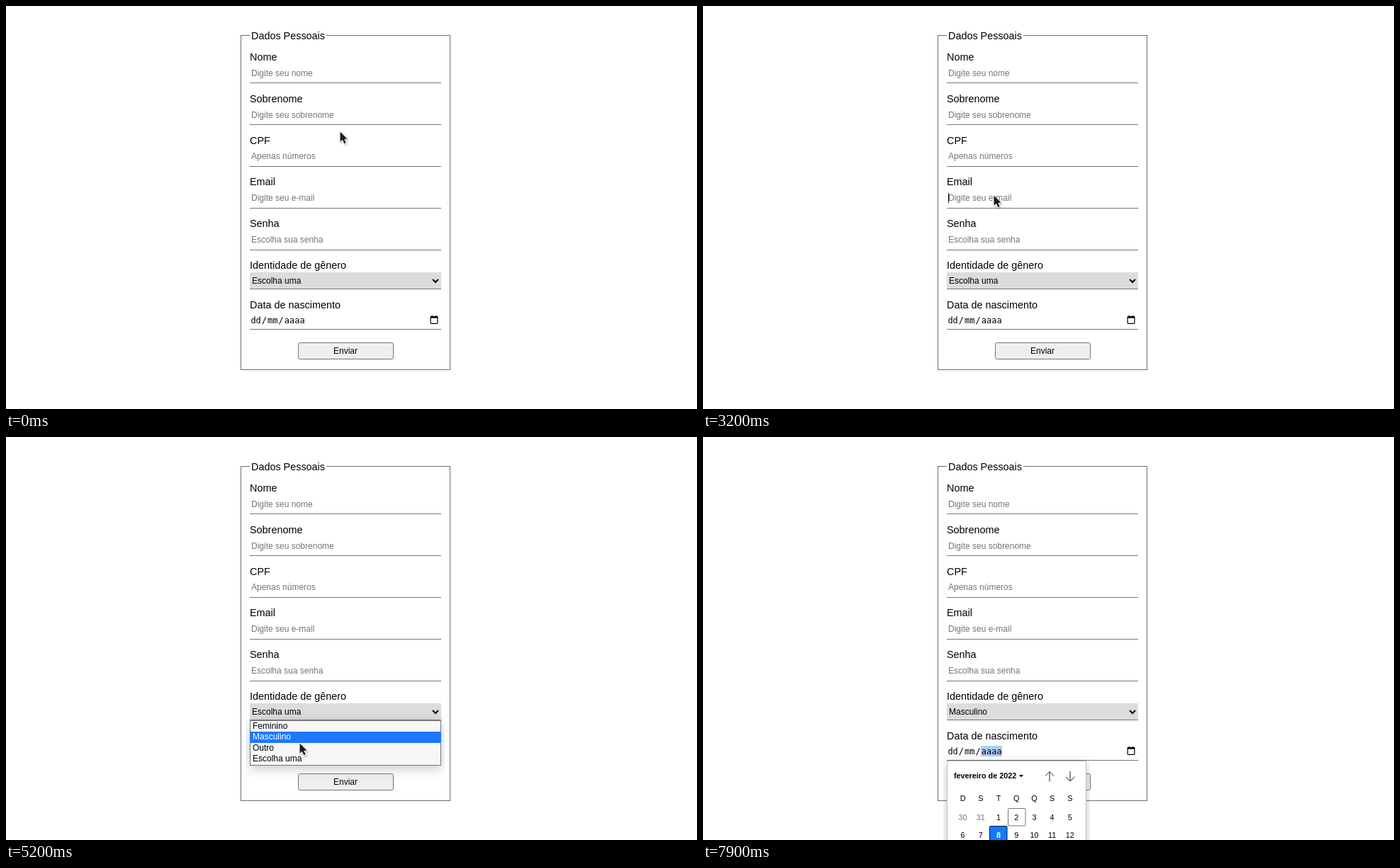
Animation, 975 px wide and 569 px high, one loop 8000 ms. Source, as an HTML page:

```html
<!DOCTYPE html>
<html lang="pt-BR">
<head>
<meta charset="utf-8">
<title>Dados Pessoais</title>
<style>
  html, body { margin: 0; width: 100%; height: 100%; overflow: hidden; background: #fff; }
  svg { display: block; font: 12px "Liberation Sans", Arial, sans-serif; }
  .label { font-size: 14.4px; }
  .hint { fill: #757575; }
  .mono { font-family: "DejaVu Sans Mono", monospace; }
  .cal { font-size: 10.8px; }
  .mid { text-anchor: middle; }
  .bold { font-weight: bold; }
  .line { fill: none; stroke: #767676; }
  .on { fill: #fff; }
</style>
</head>
<body>
<svg width="975" height="569" viewBox="0 0 975 569">
  <defs>
    <filter id="shade" x="-20%" y="-50%" width="140%" height="200%">
      <feDropShadow dx="0" dy="4" stdDeviation="8" flood-opacity=".22"/>
    </filter>
    <filter id="soft" x="-50%" y="-50%" width="200%" height="200%">
      <feDropShadow dx="1" dy="1.5" stdDeviation="1" flood-opacity=".3"/>
    </filter>
    <clipPath id="listClip"><rect x="339" y="384" width="280" height="104"/></clipPath>
    <clipPath id="calClip"><rect x="339" y="441" width="207" height="128"/></clipPath>
  </defs>
  <g id="form"></g>
  <path id="spin" d="M601 212l3.5-4 3.5 4zM601 215h7l-3.5 4z" fill="#505050"/>
  <rect id="caret" x="346" width="1" height="14"/>
  <g id="list"></g>
  <g id="calendar"></g>
  <path id="cursor" d="M0 0V14.2L3.3 11.2 5.8 16.8 8.2 15.8 5.7 10.3H10.2Z" fill="#1c1c1c" stroke="#fff"
    stroke-width="1.6" stroke-linejoin="round" paint-order="stroke" filter="url(#soft)"/>
</svg>
<script>
const LOOP = 8000, STEP = 100;
const ROW = 58.8, OPTION = 15.5, DAY = 25.2;

const $ = id => document.getElementById(id);
const text = (x, y, s, cls = '') => `<text x="${x}" y="${y}" class="${cls}">${s}</text>`;
const rect = (x, y, w, h, attrs = '') =>
  `<rect x="${x}" y="${y}" width="${w}" height="${h}" ${attrs}/>`;
const rule = y => rect(344, y, 270, 1, 'fill="#767676"');
const rowY = (top, i) => Math.floor(top + ROW * i);
const show = (id, on) => { $(id).style.display = on ? '' : 'none'; };

const fields = [
  ['Nome', 'Digite seu nome'], ['Sobrenome', 'Digite seu sobrenome'],
  ['CPF', 'Apenas números'], ['Email', 'Digite seu e-mail'], ['Senha', 'Escolha sua senha']
];
const options = ['Feminino', 'Masculino', 'Outro', 'Escolha uma'];

// Event times; focus has one click per text field.
const focus = [1000, 1700, 2500, 3100, 3600];
const spinAt = 2300, listAt = 4100, chosenAt = 5400, yearAt = 6400, popupAt = 7200, monthAt = 7400;

// Pointer stops: arrival, travel time, x, y.
const stops = [
  [400, 200, 446, 153], [800, 300, 425, 89],
  [1400, 100, 420, 123], [1700, 300, 418, 143],
  [2300, 400, 410, 204], [2900, 400, 409, 262],
  [3200, 100, 410, 267], [3400, 200, 410, 316], [3900, 300, 411, 386],
  [4600, 200, 413, 396], [5000, 400, 414, 435], [5200, 100, 414, 432],
  [5800, 400, 411, 424], [6200, 300, 411, 441], [6500, 200, 431, 444],
  [7000, 400, 602, 442], [7600, 300, 433, 488], [7900, 200, 414, 572]
];

function buildForm() {
  const inputs = fields.map(([name, hint], i) =>
    text(344, rowY(77.6, i), name, 'label') +
    text(346, rowY(99.3, i), hint, 'hint') + rule(108 + 59 * i)).join('');
  $('form').innerHTML =
    rect(331.5, 41.5, 295, 472, 'fill="none" stroke="#6c6c6c"') + rect(344, 40, 108, 3, 'fill="#fff"') +
    text(346, 47, 'Dados Pessoais', 'label') + inputs +
    text(344, 371, 'Identidade de gênero', 'label') +
    rect(344, 376, 270, 23, 'fill="#dcdcdc"') + rule(399) +
    '<text id="choice" x="347" y="392"></text>' +
    '<path d="M602 386l4 4 4-4" fill="none" stroke="#000" stroke-width="2"/>' +
    text(344, 427, 'Data de nascimento', 'label') +
    rect(392, 436, 30, 15, 'id="year" fill="#a9d0fd"') +
    ['dd', '/', 'mm', '/', 'aaaa'].map((s, i) =>
      text(345.4 + 11.83 * i + (i % 2) * 3.6, 448, s, 'mono')).join('') + rule(456) +
    rect(599.1, 438.6, 9.8, 9.8, 'rx=".8" fill="none" stroke="#000" stroke-width="1.2"') +
    rect(599, 438, 10, 2.6) + rect(600.6, 436.8, 1.3, 2) + rect(606.1, 436.8, 1.3, 2) +
    rect(412.5, 475.5, 134, 23, 'rx="2" fill="#efefef" stroke="#767676"') +
    text(479, 491, 'Enviar', 'mid');
}

function buildList() {
  $('list').innerHTML =
    '<g clip-path="url(#listClip)">' + rect(344, 400, 270, 64, 'fill="#f7f7f7" filter="url(#shade)"') + '</g>' +
    rule(399) + rect(344.5, 400.5, 269, 63, 'class="line"') +
    rect(344, 400, 270, 16, 'id="bar" fill="#1e78ff"') +
    options.map((s, i) => text(348, Math.floor(412 + OPTION * i), s, 'option')).join('');
}

function buildCalendar() {
  const colX = i => (366.6 + DAY * i).toFixed(1);
  const week = [...'DSTQQSS'].map((d, i) => text(colX(i), 514, d, 'mid')).join('');
  const days = Array.from({ length: 14 }, (_, i) => {
    const day = i < 2 ? 30 + i : i - 1;
    return `<text id="day${day}" x="${colX(i % 7)}" y="${i < 7 ? 541 : 566}" class="mid${i < 2 ? ' hint' : ''}">${day}</text>`;
  }).join('');
  const cell = (x, y, attrs) => rect(x + .5, y + .5, 24.5, 24.5, 'rx="1" ' + attrs);
  const pick = 'fill="#0f7bff" stroke="#101010"';
  $('calendar').innerHTML =
    '<g clip-path="url(#calClip)">' + rect(344, 457, 197, 250, 'fill="#fff" filter="url(#shade)"') + '</g>' +
    '<g id="month" class="cal">' + rect(344.5, 457.5, 196, 250, 'fill="none" stroke="#bfbfbf"') +
    text(354, 482, 'fevereiro de 2022', 'bold') + '<path d="M446 477h6l-3 3.5z"/>' +
    '<path d="M489 486.5V472.5M482.8 478.7l6.2-6.2 6.2 6.2M518 472v14M511.8 479.8l6.2 6.2 6.2-6.2" fill="none" stroke="#222"/>' +
    cell(430, 524, 'class="line"') + cell(430, 524, `id="pick2" ${pick}`) +
    cell(404, 549, `id="pick8" ${pick}`) + week + days + '</g>';
}

function pointer(t) {
  let x = 471, y = 177;
  for (const [end, span, toX, toY] of stops) {
    const k = Math.min(1, Math.max(0, 1 - (end - t) / span));
    x += (toX - x) * k;
    y += (toY - y) * k;
  }
  return [Math.round(x), Math.round(y)];
}

function drawCaret(t) {
  const i = focus.findLastIndex(at => at <= t);
  const on = i >= 0 && t < focus[i] + 500;
  show('caret', on);
  if (on) $('caret').setAttribute('y', rowY(88.3, i));
}

function drawList(t, y) {
  show('list', t >= listAt && t < chosenAt);
  const row = y < 390 ? 3 : Math.min(3, Math.max(0, Math.floor((y - 403) / OPTION)));
  $('bar').setAttribute('y', Math.round(400 + OPTION * row));
  document.querySelectorAll('.option').forEach((el, i) => el.classList.toggle('on', i === row));
  $('choice').textContent = options[t < chosenAt ? 3 : 1];
}

function drawCalendar(t, y) {
  show('calendar', t >= popupAt);
  show('month', t >= monthAt);
  const picked = y < 549 ? 2 : 8;
  for (const d of [2, 8]) {
    show('pick' + d, d === picked);
    $('day' + d).classList.toggle('on', d === picked);
    $('day' + d).classList.toggle('bold', d === picked);
  }
}

function draw(t) {
  const [x, y] = pointer(t);
  $('cursor').setAttribute('transform', `translate(${x + .5} ${y + .5})`);
  show('spin', t >= spinAt && t < focus[3]);
  show('year', t >= yearAt);
  drawCaret(t);
  drawList(t, y);
  drawCalendar(t, y);
}

buildForm();
buildList();
buildCalendar();
const start = performance.now();
function tick() {
  const t = (performance.now() - start) % LOOP;
  draw(Math.floor(t / STEP) * STEP);
  requestAnimationFrame(tick);
}
tick();
</script>
</body>
</html>
```
